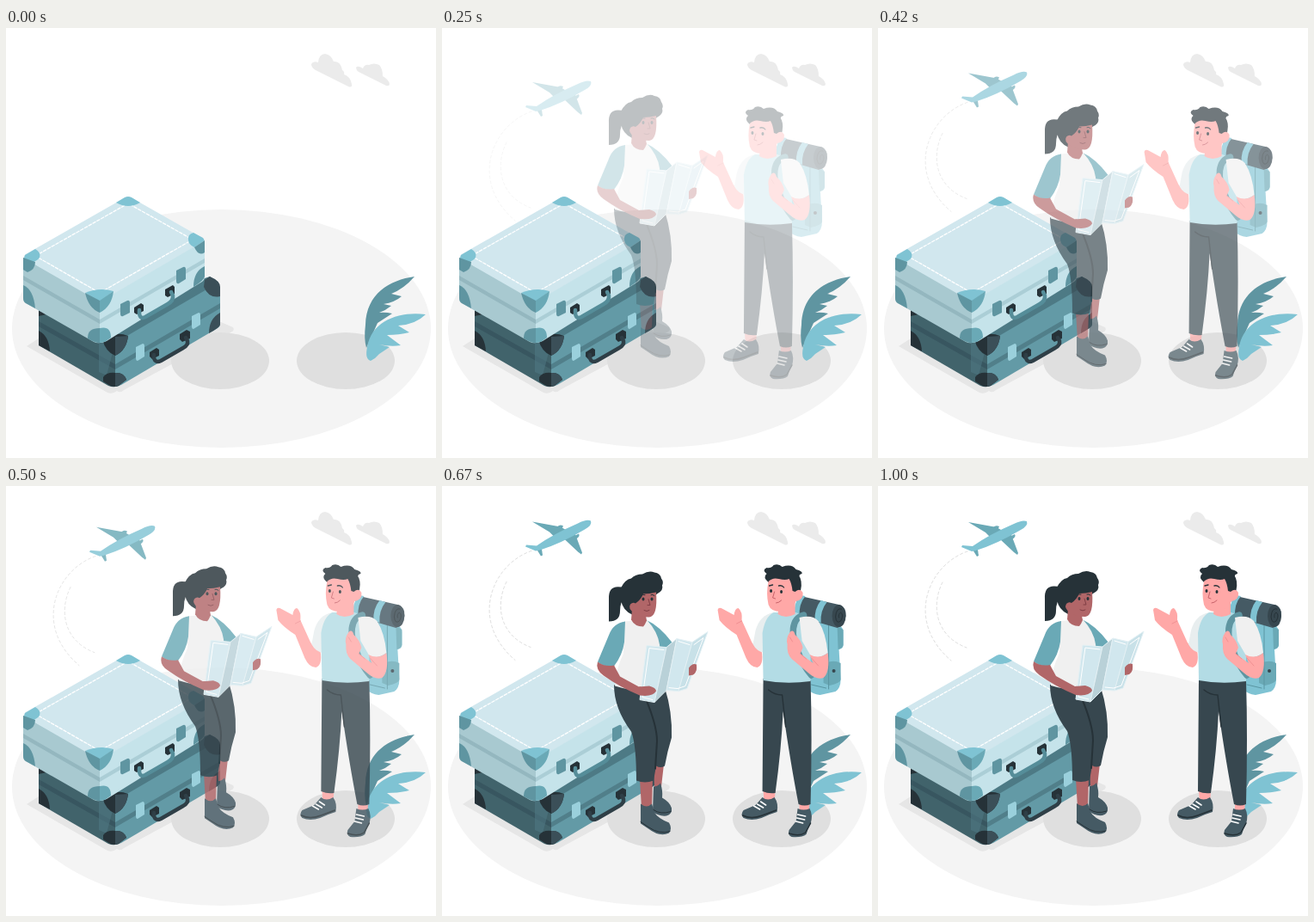
An HTML page that plays this animation: 500x500 px, repeating every 1.04 s.

```html
<!DOCTYPE html>
<html lang="en">
<head>
<meta charset="utf-8">
<title>Travellers</title>
<style>
html, body { margin: 0; width: 100%; height: 100%; overflow: hidden; background: #fff; }
svg { display: block; width: 100vw; height: 100vh; }
.ink { fill: #263238; }
.slate { fill: #37474f; }
.steel { fill: #455a64; }
.deep { fill: #5f95a1; }
.mid { fill: #6aa9b6; }
.teal { fill: #7fc3d3; }
.pale { fill: #d1e7ee; }
.brown { fill: #b16668; }
.pink { fill: #ffa8a7; }
.line { fill: none; stroke-linecap: round; stroke-linejoin: round; }
</style>
</head>
<body>
<svg viewBox="0 0 500 500">
  <!-- ground and clouds -->
  <ellipse cx="250.500" cy="349.500" rx="243.500" ry="138.500" fill="#f4f4f4"/>
  <path fill="#e6e6e6" d="M24 370L38 361L250 342L264 348Q266 351 263 353L137 421Q133 425 129 422Q124 426 118 424Z"/>
  <g fill="#dfdfdf">
    <ellipse cx="249" cy="387" rx="57" ry="33"/>
    <ellipse cx="395" cy="387" rx="57" ry="33"/>
  </g>
  <g fill="#ebebeb">
    <path d="M355 42Q357 38 363 40Q364 30 371 30Q378 31 381 39Q389 38 391 49Q394 51 393 54Q400 56 402 65Q403 70 398 68L360 49Q355 46 355 42Z"/>
    <path d="M407 46Q409 43 415 47Q417 42 422 43Q428 40 434 43Q438 47 438 56Q445 60 446 65Q446 68 442 67L410 51Q407 49 407 46Z"/>
  </g>

  <!-- leaves -->
  <path class="deep" d="M475 289C446 293 419 309 418 345Q416 361 419 372L432 343L449 332Q441 330 434 331Q442 328 448 323L439 321Q452 319 460 312L448 309Q463 303 475 289Z"/>
  <path class="teal" d="M488 333C458 329 425 340 420 371Q417 385 424 387Q430 384 434 379L446 371L434 368Q448 371 459 369L443 357Q457 357 469 354L456 346Q476 345 488 333Z"/>

  <!-- aeroplane -->
  <g id="plane">
    <g class="line" stroke="#dedede" stroke-dasharray="3 3">
      <path d="M104 76C58 92 31 157 85 203"/>
      <path d="M75 112C62 138 66 174 103 188"/>
    </g>
    <g class="mid">
      <path d="M105 42L138 48L148 54L132 61L125 54Z"/>
      <path d="M141 61L154 54L163 78L162 80L158 77Z"/>
      <path d="M134 48Q137 45 141 47L139 51Z"/>
      <path d="M153 59L159 56Q161 59 156 62Z"/>
      <path d="M110 74L116 74L117 81L115 82Z"/>
    </g>
    <path class="teal" d="M173 41Q175 46 166 51Q139 67 114 75L109 76L97 71L98 69L110 70Q130 56 158 44Q168 39 173 41Z"/>
  </g>

  <!-- lower suitcase -->
  <path fill="#41636b" d="M38 318L127 364V417Q124 418 119 416L38 369Z"/>
  <path fill="#639aa6" d="M127 364L236 295L249 302V344Q249 347 246 349L134 415Q130 417 127 417Z"/>
  <path fill="#4d7a85" d="M109 362L231 291L237 289L247 296L127 366Z"/>
  <path fill="#385660" d="M38 341L127 391V397L38 347Z"/>
  <path fill="#517f8a" d="M127 391L249 320V326L127 397Z"/>
  <path fill="#527c87" d="M108 360L127 366L117 404L108 400Z" opacity=".5"/>
  <g class="ink">
    <path d="M112 362Q127 352 142 358Q140 375 127 381Q116 377 112 362Z"/>
    <path d="M113 406Q117 400 127 401Q137 400 140 409L131 416Q127 418 121 416L113 411Z"/>
    <path d="M38 352Q50 358 51 376L38 369Z"/>
    <path d="M38 328L47 333L38 335Z"/>
  </g>
  <path fill="#3b4f58" d="M230 301L231 293L237 289Q249 294 249 301V312Q236 315 230 301ZM127 381V359L142 358Q140 375 127 381ZM127 417V401Q137 400 140 409L132 415ZM249 331V345Q249 348 236 355Q236 338 249 331Z"/>
  <g fill="#9ad0dc">
    <path d="M151 371L159 367Q161 367 161 370V382L153 387Q151 387 151 384Z"/>
    <path d="M216 335L224 331Q226 331 226 334V345L218 350Q216 350 216 347Z"/>
  </g>
  <g class="ink">
    <path d="M167 377L175 372L178 374V381L170 385L167 382Z"/>
    <path d="M202 356L210 351L214 353V361L205 365L202 362Z"/>
  </g>
  <path class="line" stroke="#2f3f47" stroke-width="4.500" d="M172 380V384Q174 390 180 387L206 372Q212 369 211 364L209 360"/>

  <!-- upper suitcase -->
  <path fill="#a8c9d0" d="M20 267L109 317V366Q106 367 102 365L23 320Q20 318 20 314Z"/>
  <path fill="#c5e3ea" d="M109 317L231 246V288Q231 293 228 295L117 364Q113 366 109 366Z"/>
  <path class="pale" d="M23 263L137 198Q142 195 147 198L228 244Q231 246 228 249L115 315Q109 319 103 315L23 269Q19 266 23 263Z"/>
  <path fill="#94b7bf" d="M20 288L109 339V344L20 293Z"/>
  <path fill="#abced6" d="M109 339L231 268V273L109 344Z"/>
  <path class="line" stroke="#fff" stroke-width="1.300" stroke-dasharray="3.500 2" stroke-linecap="butt" d="M34 265L142 204L217 246L109 308Z"/>
  <g class="teal">
    <path d="M128 203L138 197Q142 195 146 197L156 203Q142 211 128 203Z"/>
    <path d="M22 264L34 257Q41 261 39 267Q36 271 29 273L21 268Z"/>
    <path d="M212 246Q211 240 218 238L229 244Q232 247 228 249L219 255Q212 252 212 246Z"/>
    <path d="M92 308Q109 301 125 306L109 318Z"/>
  </g>
  <g class="deep">
    <path d="M20 267L34 272Q34 281 25 284L20 281Z"/>
    <path d="M219 255L231 247V261Q224 266 219 255Z"/>
    <path d="M92 308L109 317V331Q96 326 92 308Z"/>
    <path d="M20 299Q32 304 34 326L23 320Q20 318 20 314Z"/>
    <path d="M95 360Q95 349 109 349V366Q105 367 95 361Z"/>
    <path d="M231 277V289Q231 293 218 301Q218 283 231 277Z"/>
    <path d="M133 321L141 317Q144 316 144 320V331L136 335Q133 336 133 332Z"/>
    <path d="M198 282L206 278Q209 277 209 281V292L201 297Q198 298 198 294Z"/>
  </g>
  <path class="mid" d="M109 317L125 306Q123 324 109 331ZM109 349Q122 346 122 360L115 365L109 366Z"/>
  <g class="ink">
    <path d="M149 325L157 320L160 322V329L152 333L149 331Z"/>
    <path d="M185 304L194 299L196 301V309L188 313L185 311Z"/>
  </g>
  <path class="line" stroke="#558d99" stroke-width="4.500" d="M155 328V332Q156 339 162 336L188 321Q195 317 194 311L192 307"/>

  <!-- woman with map -->
  <g id="woman">
    <path class="brown" d="M230 340L245 339L244 373L232 374ZM246 324L258 323L255 349L247 350Z"/>
    <g class="steel">
      <path d="M246 349Q251 349 254 345Q257 354 256 362Q265 367 267 374Q268 381 261 383Q252 384 245 378Z"/>
      <path d="M231 369Q238 375 244 369L247 379Q251 386 264 391Q268 398 264 403Q253 408 240 398L231 392Z"/>
    </g>
    <path class="line" stroke="#263238" d="M231 390L240 396Q253 405 265 401M246 376Q254 382 266 378"/>
    <path class="slate" d="M200 231Q200 258 220 285Q226 300 226 342Q236 346 246 342L249 325Q254 328 259 325Q262 308 267 292Q268 262 259 234L230 226Z"/>
    <path class="line" stroke="#263238" stroke-width="2" d="M237 247Q250 278 250 296L248 328"/>
    <path class="mid" d="M237 155Q253 162 268 182L257 196L243 180Z"/>
    <path fill="#f0f0f0" d="M212 157L238 155Q251 169 253 184L257 236Q226 240 201 232Q201 216 211 194Z"/>
    <path class="ink" d="M213 118Q193 112 194 131V157Q207 157 207 145Q207 133 214 129Z"/>
    <path class="ink" d="M208 118Q213 108 220 107Q225 102 233 102Q241 97 247 100Q254 101 255 107Q258 111 256 115Q258 121 250 125L238 135L221 149Q210 144 208 132Z"/>
    <path class="brown" d="M221 143L236 145L238 156Q236 161 234 163Q224 163 220 155Z"/>
    <path class="brown" d="M249 123Q251 151 241 152Q228 152 223 147Q216 142 219 137Q222 134 225 136Q231 132 234 125Q242 125 249 123Z"/>
    <g class="ink">
      <ellipse cx="234" cy="131" rx="1.500" ry="2"/>
      <ellipse cx="244" cy="131" rx="1.500" ry="2"/>
    </g>
    <path class="line" stroke="#263238" d="M231 127.500Q233 125 236 126M243 126Q245 125 247 127"/>
    <path class="line" stroke="#803f45" d="M240 131L242 138L239 138M235 144Q238 146 241 144"/>
    <path class="mid" d="M213 157Q199 159 194 173L181 204Q189 211 200 209Q210 196 212 181Z"/>
    <path class="brown" d="M181 204Q189 210 200 208L207 221L229 233L241 232Q249 234 249 238Q245 245 230 243Q206 233 188 220Q178 213 181 204Z"/>
    <path class="brown" d="M284 207Q293 203 296 208Q297 218 287 221Z"/>
    <g stroke="#e3f0f4" stroke-width="1" stroke-linejoin="round">
      <path class="pale" d="M238 185L261 187L247 251L230 248Z"/>
      <path fill="#b9d1d8" d="M261 187L273 177L261 237L247 251Z"/>
      <path class="pale" d="M273 177L291 181L275 238L261 237Z"/>
      <path fill="#c8e1e8" d="M291 181L309 169L285 235L275 238Z"/>
    </g>
    <path class="line" stroke="#fff" d="M258 190L241 188L233 245L245 248M275 180L288 184M264 234L274 235L283 232L304 176L293 184"/>
    <path class="brown" d="M229 233L241 232Q249 234 249 238Q245 245 230 243ZM287 211Q291 205 296 207Q297 216 292 219L287 220Z"/>
  </g>

  <!-- man with backpack -->
  <g id="man">
    <path class="teal" d="M424 149L450 155Q466 161 466 170V185Q466 189 461 190L463 225Q463 235 457 239L439 243Q430 242 424 236Z"/>
    <path class="mid" d="M459 163L466 167V185Q465 189 460 190ZM443 207Q454 201 463 206V225Q463 229 450 232L443 229Z"/>
    <path class="line" stroke="#5a96a3" d="M449 162V236M429 231L446 235"/>
    <circle class="slate" cx="455" cy="215" r="2"/>
    <path class="steel" d="M412 127L461 138Q470 141 469 151Q467 163 459 165L411 151Z"/>
    <path class="teal" d="M416 127L422 128Q414 137 415 153L409 151Q408 136 416 127ZM440 133L447 135Q439 145 440 159L433 157Q432 143 440 133Z"/>
    <ellipse class="slate" cx="461" cy="151" rx="8" ry="13"/>
    <path class="line" stroke="#263238" d="M464 143Q458 141 457 152Q458 161 463 157Q467 150 463 147Q460 149 461 153"/>

    <path class="pink" d="M373 353L387 354L386 369L374 369ZM415 367L427 367L426 381L415 381Z"/>
    <g class="steel">
      <path d="M372 362Q378 367 386 362Q391 369 389 379Q379 382 371 386Q359 390 350 386Q346 382 350 377L364 371Z"/>
      <path d="M413 375Q420 378 427 375Q431 383 428 393Q425 398 423 405Q418 409 406 408Q401 406 403 400L411 390Z"/>
    </g>
    <path class="line" stroke="#263238" stroke-width="1.500" d="M349 383Q359 388 372 383L388 377M403 404Q415 408 422 403L428 392"/>
    <path class="line" stroke="#fff" stroke-width="1.600" d="M362 372L369 376M366 370L373 374M370 367L376 371M411 390L419 392M412 386L421 388M413 382L422 384"/>

    <path class="slate" d="M373 224L428 226Q430 292 428 370Q421 373 414 370Q405 324 396 262Q394 306 387 357Q379 358 372 355Z"/>
    <path class="line" stroke="#263238" stroke-width="1.400" d="M379 237Q386 243 395 243L399 280"/>

    <path class="pink" d="M320 144Q321 140 326 143L339 150Q340 142 344 142Q349 146 348 156L358 178Q361 187 371 191Q374 208 366 211Q358 211 353 200L342 173Q328 164 322 156Z"/>
    <path fill="#e8eeef" d="M385 147Q369 150 364 168L361 184Q365 192 374 194L381 165Z"/>
    <path fill="#b3dce5" d="M385 147L411 147Q424 151 428 174L428 227Q399 231 373 226L372 171Q375 152 385 147Z"/>
    <path class="line" stroke="#5f95a1" stroke-width="7.500" stroke-linecap="butt" d="M420 150C405 154 405 174 413 192Q418 207 429 220"/>
    <path fill="#f0f0f0" d="M415 153Q430 149 437 157Q446 171 448 194Q439 201 429 199L418 180Z"/>
    <path class="pink" d="M427 196Q438 202 448 194Q451 216 443 223Q435 226 425 217L406 201Q400 195 401 184Q399 177 404 170Q408 166 410 173Q417 179 419 188L416 195L431 206Z"/>
    <path class="line" stroke="#ed8b8d" stroke-width=".8" d="M404 176L407 181M416 195L423 201M429 200L437 209M348 157L342 160"/>

    <path class="pink" d="M391 139L410 132L410 149Q399 155 390 149Z"/>
    <path class="ink" d="M379 112Q372 106 377 102Q371 98 377 95Q382 96 385 92Q391 90 395 94Q406 90 411 97Q419 99 418 102Q413 103 416 107Q419 115 415 126L409 133L402 119Z"/>
    <path class="pink" d="M379 111Q384 106 391 108Q399 110 403 108Q406 113 407 122L410 123Q416 118 419 124Q420 132 411 134Q407 144 396 146Q382 147 379 138Q376 125 379 111Z"/>
    <g class="ink">
      <ellipse cx="382" cy="122" rx="1.500" ry="2"/>
      <ellipse cx="394" cy="123" rx="1.500" ry="2"/>
    </g>
    <path class="line" stroke="#263238" stroke-width="1.300" d="M380 116L384 115M391 116Q395 115 397 118"/>
    <path class="line" stroke="#c8626a" d="M386 123L384 130L387 131M388 136Q391 136 394 133"/>
  </g>
</svg>
<script>
const LOOP = 1040, FPS = 24, SHIFT = 30, BLANK = 2;
const [plane, woman, man] = ["plane", "woman", "man"].map(id => document.getElementById(id));

const curve = (a, b, s) => 3 * (1 - s) ** 2 * s * a + 3 * (1 - s) * s * s * b + s ** 3;

// Eased progress that overshoots before settling at 1
function ease(x) {
  if (x >= 1) return 1;
  let lo = 0, hi = 1;
  for (let i = 0; i < 30; i++) {
    const mid = (lo + hi) / 2;
    if (curve(0.36, 0.5, mid) < x) lo = mid; else hi = mid;
  }
  return curve(-0.01, 1.38, lo);
}

function place(el, x, y, alpha) {
  el.setAttribute("transform", `translate(${x} ${y})`);
  el.setAttribute("opacity", alpha);
}

function draw(now) {
  const t = Math.floor(now % LOOP / 10) * 10;
  const step = Math.floor((t + 5) * FPS / 1000);
  const p = step < BLANK ? 0 : ease((step + 0.9) / FPS);
  const away = (1 - p) * SHIFT;
  const alpha = Math.min(1, p);
  place(plane, 0, away, alpha);
  place(woman, 0, -away, alpha);
  place(man, -away, 0, alpha);
}

const start = performance.now();
function loop() {
  draw(performance.now() - start);
  requestAnimationFrame(loop);
}
loop();
</script>
</body>
</html>
```
